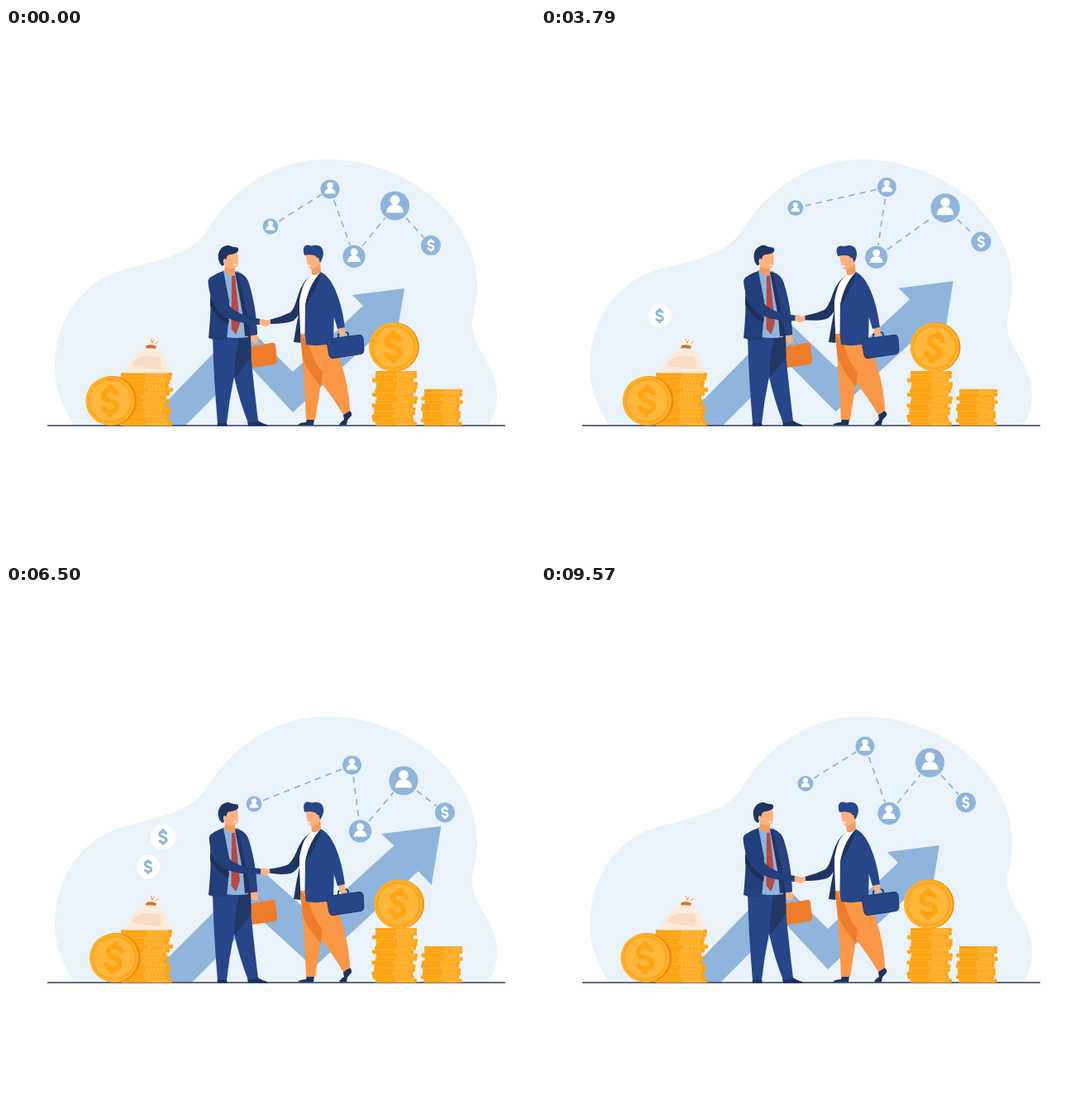
Recreate the animation shown at these times as an HTML page. Size 640 by 640 pixels, loop 9640 ms.

```html
<!DOCTYPE html>
<html lang="en">
<head>
<meta charset="utf-8">
<title>Handshake</title>
<style>
html, body { margin: 0; width: 100%; height: 100%; overflow: hidden; background: #fff; }
svg { display: block; width: 100vw; height: 100vh; }
</style>
</head>
<body>
<svg viewBox="0 0 640 640" xmlns="http://www.w3.org/2000/svg">
<defs>
  <clipPath id="above"><rect width="640" height="481"/></clipPath>
  <path id="dollar" fill="none" stroke-width="3.2" d="M4.1,-3.7C3.6,-5.8 2,-6.8 0,-6.8C-2.5,-6.8 -4.1,-5.4 -4.1,-3.5C-4.1,-1.1 -2,-.5 0,0C2.3,.5 4.2,1.2 4.2,3.5C4.2,5.6 2.5,6.8 0,6.8C-2.3,6.8 -3.9,5.8 -4.3,3.6M0,-10V-6.5M0,6.5V10"/>
  <g id="person" fill="#fff"><circle cy="-6.8" r="5.8"/><path d="M-10,8.5C-10,2 -6,-1.5 0,-1.5S10,2 10,8.5Z"/></g>
  <g id="face">
    <circle r="29.6" fill="#ffb02a"/><circle r="25.6" fill="#ffb73c"/>
    <circle r="25.6" fill="none" stroke="#ffa412" stroke-width="1.6"/>
    <use href="#dollar" transform="scale(1.95)" stroke="#ffa412"/>
  </g>
</defs>

<path fill="#eaf3fa" d="M82,481C72,463 59,440 59,411C59,350 95,306 140,293C190,279 222,276 244,244C273,196 325,159 388,159C485,159 570,228 570,312C570,338 563,347 564,361C566,392 594,405 594,444C594,458 590,470 584,481Z"/>
<path id="arrow" fill="#8fb5dc" clip-path="url(#above)"/>
<g id="links" stroke="#8fb5dc" stroke-width="1.8" stroke-dasharray="7.5 6"></g>
<g id="nodes"></g>
<g id="bubbles"></g>
<path d="M50,481H604" stroke="#2b3a5e" stroke-width="1.7"/>
<g id="stacks"></g>

<g id="bag">
  <path fill="#fcebdb" d="M143,417.5C148,406 156,393 169,387H181C191,393 197,406 197,417.5Z"/>
  <path fill="#f8dcc3" d="M152,408C157,399 165,395 186,398C188,403 188,409 186,413Q167,411 152,408Z"/>
  <path fill="#fdf3ea" d="M171,384L168.5,377L174,376L177,374L179,377L185,377L186,379L181,385Z"/>
  <path fill="none" stroke="#d98a52" stroke-width=".9" d="M175,376L177,381M179,377L177,381M181,382L185,379"/>
  <path fill="#d7702b" d="M170,384Q176,382 182,385L181,388Q175,387 169,387.5Z"/>
</g>

<g class="coin"><circle cx="128.2" cy="451" r="30" fill="#ee8a10"/><use href="#face"/></g>
<g class="coin"><circle cx="470.2" cy="386" r="29.7" fill="#ee8a10"/><use href="#face"/></g>

<g id="leftMan">
  <path fill="none" stroke="#8fa5bd" stroke-width="1.8" d="M303,383L303,379Q307,376 310,382"/>
  <path fill="#ee7d2b" d="M294,386L321,381Q325,380 326,384L328,402Q328.5,406 325,407L294,411.5Z"/>
  <path fill="#ffb27d" d="M295,370L303,371Q306,378 304,382L299,381L295,378Z"/>
  <path fill="#1e325f" d="M256,477.5H267L268,481.5H255.5ZM292,476L303,474Q309,478 316,480L317,481.5H293Z"/>
  <path fill="#27468a" d="M250,372H296L296.5,398Q300,435 305,475L293,478Q282,450 276,422Q270,450 267,478H256Q251,420 250,372Z"/>
  <path fill="#213866" d="M296,372L296.5,398L277,424Q275,403 282,374Z"/>
  <path fill="#8fb5dc" d="M262,293L282,294L293,374Q280,376 266,374Z"/>
  <path fill="#b94842" d="M273,300L277,299.5L283,357L278.5,371L272.5,364Z"/>
  <path fill="#1f3561" d="M277,295C286,297 291,301 293,308C299,326 303,350 304,371L289,373L287,350Z"/>
  <path fill="#27427f" d="M280,295C287,297 292,302 294,309C300,328 303,348 304,371L296,372L289,332Z"/>
  <path fill="#213f7a" d="M263,294C254,297 248,300 246,305C249,330 247,355 245,375Q254,379 267,378Q270,350 270,330Z"/>
  <path id="cuffShade" fill="#1e3056"/>
  <g id="leftHead">
    <path fill="#f29b62" d="M265,287L277,288L277,298Q270,301 264,295Z"/>
    <path fill="#ffb27d" d="M263,277L271,272L280,272C281,279 282,286 279,289Q273,293 265,289Z"/>
    <path fill="#1f3561" d="M257,279C255,269 263,262 270,263C275,266 280,264 281,267C282,272 277,273 269,274.5Q266,277 267,280L264,279Q262,281 264,286L262,288C259,286 257.5,283 257,279Z"/>
    <path fill="#fff" d="M274.5,286.5L279,285.5Q278,289 274.5,286.5Z"/>
  </g>
</g>

<g id="rightMan">
  <path id="farArm" fill="#1f3561"/>
  <path fill="#1e325f" d="M364,473H373L372,480.5H353Q354,477.5 363,477ZM408,468L415.5,463Q419,465 418,469L413,474.5L412,480.5H403Q404,477 409,474Z"/>
  <path fill="#f99746" d="M385,382H396Q408,409 412,430Q416,450 416,463L408,468Q395,446 381,429Q378,450 374,474H363Q362,445 359,405L356,370H372Z"/>
  <path fill="#ee7d2b" d="M356,370L366,382Q373,407 383,416L381,434Q364,414 359,399Z"/>
  <path fill="#fff" d="M373,297C362,302 358,313 355,330V370H363L364,335L381,298Z"/>
  <path fill="#1f3561" d="M355,341Q351,360 348,380L356.5,381L356,365Z"/>
  <path fill="#27468a" d="M381,295C391,302 394,320 397,342L396,381Q380,386 363,383L361.5,371L362,335C365,318 373,304 381,295Z"/>
  <path fill="#1f3561" d="M381,296C372,304 365,318 362,336Q372,322 379,304Z"/>
  <path fill="none" stroke="#1f3561" stroke-width="1.7" d="M402,376L402,371Q403,369 406,369L411,368Q413,368 414,370L414,374"/>
  <path fill="#27468a" stroke="#1f3561" stroke-width="1" d="M392,376L427,371.5Q431,371 432,375L433,389Q433,394 429,394.5L396,399.5Q392,400 391,396L388.5,382Q388,377 392,376Z"/>
  <path fill="#ffb27d" d="M402,362L409,362L411,369L409,373L405,373L403,369Z"/>
  <path fill="#27468a" d="M382,296C397,303 407,336 410,362L401,364C397,350 393,338 388,326Z"/>
  <g id="rightHead">
    <path fill="#f29b62" d="M369,287L380,283L381,295Q375,301 370,298Z"/>
    <path fill="#ffb27d" d="M363,274L381,274L380,285Q376,292 367,291Q363,284 363,274Z"/>
    <path fill="#27468a" d="M361,275C358,266 361,262 366,262.5Q369,264 372,263C380,262 384,266 384,273Q383,280 380,284L378,278Q376,279 375,276Q369,273 361,275Z"/>
    <path fill="#fff" d="M365,286.5L369,287Q367,290.5 365,286.5Z"/>
  </g>
</g>
<path id="nearArm" fill="#213f7a"/>
<path id="hands" fill="#ffb27d"/>
</svg>

<script>
const LOOP = 9640, HALF = LOOP / 2;
const el = id => document.getElementById(id);
const make = (parent, tag, attrs = {}) => {
  const node = document.createElementNS('http://www.w3.org/2000/svg', tag);
  set(node, attrs);
  return parent.appendChild(node);
};
function set(node, attrs) { for (const k in attrs) node.setAttribute(k, attrs[k]); }

const lerp = (a, b, p) => a + (b - a) * p;
const clamp = v => Math.min(1, Math.max(0, v));
const sine = p => (1 - Math.cos(Math.PI * clamp(p))) / 2;
const cubic = p => (p = clamp(p)) < .5 ? 4 * p ** 3 : 1 - 4 * (1 - p) ** 3;
const wave = (t, period) => (1 - Math.cos(2 * Math.PI * t / period)) / 2;

// Blend two paths with the same commands.
function blend(a, b, p) {
  const ends = b.match(/-?[\d.]+/g);
  let i = 0;
  return a.replace(/-?[\d.]+/g, n => lerp(+n, +ends[i++], p).toFixed(2));
}

// Value of [time, value] keys with smooth steps between them.
function track(keys, t) {
  let i = 1;
  while (i < keys.length - 1 && t > keys[i][0]) i++;
  const [t0, a] = keys[i - 1], [t1, b] = keys[i];
  return lerp(a, b, sine((t - t0) / (t1 - t0)));
}

const shapes = {
  arrow: [
    'M166,481L287,356L347,416L432,336L419,323L482,315L472,377L459,363L347,465L292,406L217,481Z',
    'M166,481L311,337L382,398L481,309L465,294.5L540,284.5L528,359L511,341L380,462L309,400L227,481Z'],
  nearArm: [
    'M252,300C260,302 260,316 268,332C273,343 290,349 308,352L307,359C290,358 272,355 262,347C250,338 245,318 244.5,306Q246,300 252,300Z',
    'M253,300C261,302 261,314 269,328C274,337 290,340 309,341L309,347C292,349 274,347 264,341C252,334 247,318 246,306Q247,300 253,300Z'],
  farArm: [
    'M372,298C361,303 356,314 352,328Q348,341 344,344Q332,350 319,353L319,358Q339,358 348,354Q356,347 362,330Z',
    'M372,298C361,303 356,311 351,322Q345,334 340,337Q331,340 318,341L318,346Q338,350 347,346Q356,340 362,325Z'],
  cuffShade: [
    'M247,325Q253,343 270,353L269,359Q255,351 247,336Z',
    'M247,322Q253,337 270,346L269,354Q255,345 247,333Z'],
  hands: [
    'M307,352Q312,352 315,354L320,352.5L320,358Q317,361 313,361Q309,360 306.5,358Z',
    'M308.5,341Q312,339 315,341L319,341.5L319,346Q316,348 313,348Q310,348 308.5,347Z']
};
const morph = (id, p) => el(id).setAttribute('d', blend(...shapes[id], p));

// Each node: radius and three poses.
const spots = [
  [9.4, [320, 240], [308.8, 212], [300, 265]],
  [11.5, [392, 195], [418.4, 189.5], [418.6, 218]],
  [13.6, [421, 276.4], [403, 275], [428.6, 298]],
  [17.6, [470.5, 215], [490.1, 215.5], [481, 236.8]],
  [12, [514, 263], [532.7, 256.5], [531, 275.2]]
].map(([r, a, b, c], i) => {
  const g = make(el('nodes'), 'g');
  make(g, 'circle', { r, fill: '#8fb5dc' });
  make(g, 'use', i < 4
    ? { href: '#person', transform: `scale(${r / 17.5})` }
    : { href: '#dollar', stroke: '#fff', transform: 'scale(.78)' });
  const keys = k => [[0, a[k]], [3080, b[k]], [6427, c[k]], [LOOP, a[k]]];
  return { r, g, x: keys(0), y: keys(1) };
});
const links = spots.slice(1).map(() => make(el('links'), 'line'));

// Bubbles: x, start, bottom y, climb.
const bubbles = [
  [190, 80, 375, 90], [172, 700, 375, 64.5], [143.5, 2880, 378, 60]
].flatMap(([x, start, y, climb]) => [0, HALF].map(shift => {
  const g = make(el('bubbles'), 'g');
  make(g, 'circle', { r: 16, fill: '#fff' });
  make(g, 'use', { href: '#dollar', stroke: '#8fb5dc' });
  return { g, x, y, climb, start: start + shift };
}));

function stack(x, y, width, rows) {
  const g = el('stacks'), h = (481 - y) / rows.length;
  rows.forEach((dx, i) => {
    const left = x + dx, top = y + i * h;
    make(g, 'rect', { x: left, y: top, width, height: h + .2, rx: 1, fill: '#ffa412' });
    make(g, 'rect', { x: left + width * .5, y: top + .3, width: width * .42, height: h - .7, fill: '#ffb437' });
    for (let s = 0; s < 6; s++)
      make(g, 'rect', { x: left + width * (.5 + s * .07), y: top, width: .8, height: h, fill: '#ffa61a' });
  });
}
stack(135, 417, 62, [4, 3, 1, 0, 5, 1, -3, 0, -2, 2, 2, 0, 1, 4]);
stack(442.5, 415, 50, [4.5, 4.5, .5, 5.5, 5, 3.5, .5, 5.5, 4.5, 0, 3, 2.5, 0, 1, 4.5]);
stack(502, 437, 46, [4, 4, .5, 4.5, 1, 0, 2, 2, 0, 3.5]);

const coins = [...document.querySelectorAll('.coin')];
function roll(coin, x, y, dx) {
  coin.setAttribute('transform', `translate(${dx} 0)`);
  const turn = dx / 29.8 * 180 / Math.PI;
  coin.lastElementChild.setAttribute('transform', `translate(${x} ${y}) rotate(${turn})`);
}

const leftNod = [[0, 0], [2430, 1], [4860, .25], [6400, 0], [8000, 1], [9570, 0], [LOOP, 0]];
const rightNod = [[0, 0], [2430, 1], [3900, -2], [5000, -1.3], [6500, .3], [8000, -1.5], [LOOP, 0]];

function draw(t) {
  const half = t % HALF;
  morph('arrow', half < 2480 ? sine(half / 2480) : 1 - cubic((half - 2480) / 2250));

  const shake = wave(t, HALF);
  ['nearArm', 'farArm', 'cuffShade', 'hands'].forEach(id => morph(id, shake));
  set(el('leftHead'), { transform: `rotate(${track(leftNod, t) * 5} 270 294)` });
  set(el('rightHead'), { transform: `rotate(${track(rightNod, t) * 2.4} 376 296)` });

  roll(coins[0], 126, 451, shake * 5.8);
  roll(coins[1], 468.6, 386, wave(t, LOOP) * 8.6);

  const at = spots.map(s => [track(s.x, t), track(s.y, t)]);
  spots.forEach((s, i) => set(s.g, { transform: `translate(${at[i]})` }));
  links.forEach((line, i) => {
    const [ax, ay] = at[i], [bx, by] = at[i + 1];
    const d = Math.hypot(bx - ax, by - ay);
    const p = (spots[i].r + 2.6) / d, q = 1 - (spots[i + 1].r + 1) / d;
    set(line, { x1: lerp(ax, bx, p), y1: lerp(ay, by, p), x2: lerp(ax, bx, q), y2: lerp(ay, by, q) });
  });

  for (const b of bubbles) {
    const u = (t - b.start) / 2400;
    const on = u > 0 && u < 1;
    const alpha = on ? clamp((.98 - u) / .26) * clamp((9500 - t) / 400) : 0;
    const y = b.y - b.climb * u * (1.5 - .5 * u);
    const size = Math.min(1, .77 + .3 * u) * clamp(u / .08);
    set(b.g, { opacity: alpha, transform: `translate(${b.x} ${y}) scale(${size})` });
  }
}

function tick() {
  draw(performance.now() % LOOP);
  requestAnimationFrame(tick);
}
tick();
</script>
</body>
</html>
```
